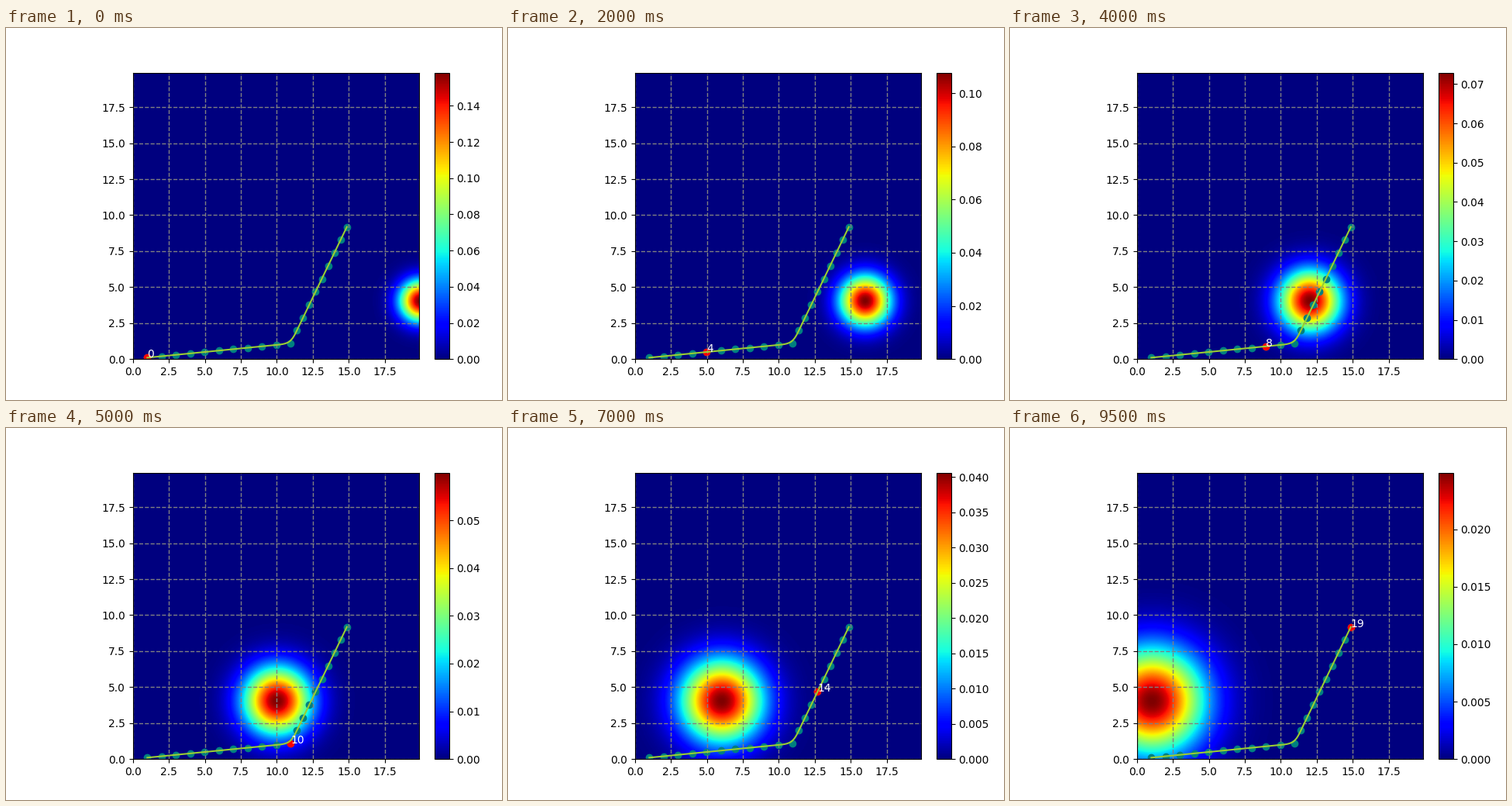
Write a matplotlib script that moves like this. It is 640x480 px and loops after 10000 ms.

```python
import numpy as np
import matplotlib.pyplot as plt
from matplotlib.animation import FuncAnimation

STEPS = 20
EXTENT = 19.9
GROWTH = 1.05

grid = np.arange(200) * 0.1
gx, gy = np.meshgrid(grid, grid)


def density(step):
    """Gaussian drifting left and widening by a fixed factor per step."""
    var = GROWTH ** (2 * step)
    dist = (gx - (STEPS - step)) ** 2 + (gy - 4) ** 2
    return np.exp(-dist / (2 * var)) / (2 * np.pi * var)


def waypoints():
    """Unit steps along one heading, then a sharp turn to another."""
    headings = np.where(np.arange(STEPS - 1) < 10, 0.098, 1.121)
    moves = np.column_stack([np.cos(headings), np.sin(headings)])
    return np.vstack([[1, 0.1], [1, 0.1] + np.cumsum(moves, axis=0)])


def smooth(points, samples=12):
    """Uniform cubic B-spline with linearly extended ends."""
    ctrl = np.vstack([2 * points[0] - points[1], points,
                      2 * points[-1] - points[-2]])
    t = np.linspace(0, 1, samples)[:, None]
    basis = ((1 - t) ** 3, 3 * t**3 - 6 * t**2 + 4,
             -3 * t**3 + 3 * t**2 + 3 * t + 1, t**3)
    return np.vstack([sum(b * ctrl[i + j] for j, b in enumerate(basis)) / 6
                      for i in range(len(points) - 1)])


path = waypoints()
curve = smooth(path)

fig, ax = plt.subplots(figsize=(6.4, 4.8), dpi=100)
image = ax.imshow(density(0), cmap="jet", origin="lower",
                  extent=(0, EXTENT, 0, EXTENT))
fig.colorbar(image, ax=ax, fraction=0.046, pad=0.04)
ax.grid(color="gray", linestyle="--", linewidth=1)
ax.scatter(*path.T, color="teal")
marker = ax.scatter(*path[0], color="red")
ax.plot(*curve.T, color="yellowgreen")
label = ax.text(*path[0], "0", color="white")
ax.set(xlim=(0, EXTENT), ylim=(0, EXTENT))


def update(step):
    field = density(step)
    image.set_data(field)
    image.set_clim(field.min(), field.max())
    marker.set_offsets(path[step])
    label.set_position(path[step])
    label.set_text(str(step))
    return image, marker, label


anim = FuncAnimation(fig, update, frames=STEPS, interval=500,
                     repeat=True, repeat_delay=0, blit=False)
plt.show()
```
